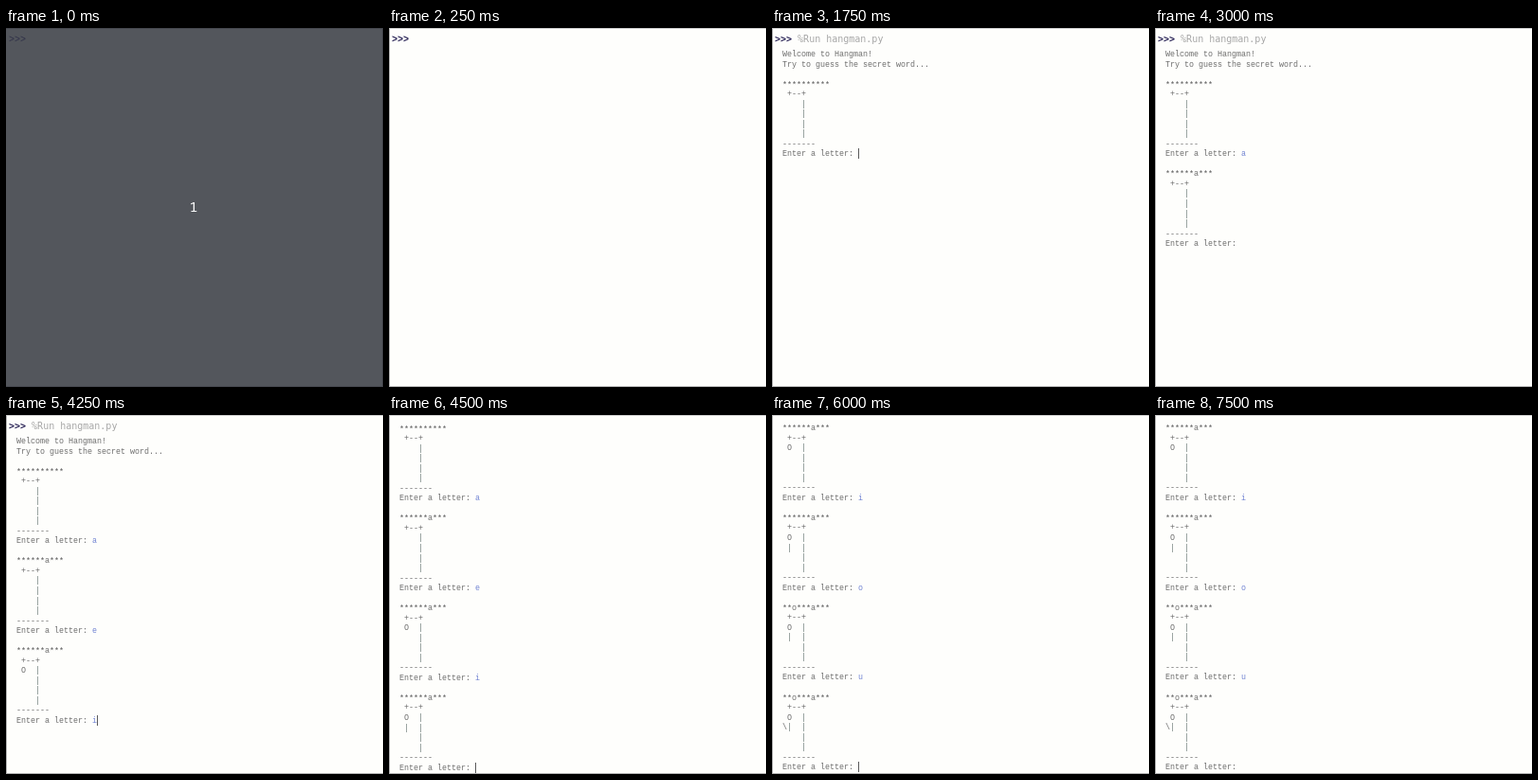
Recreate the animation shown at these times as an HTML page. Size 398 by 379 pixels, loop 8000 ms.

```html
<!DOCTYPE html>
<html lang="en">
<head>
<meta charset="utf-8">
<title>Hangman in a shell</title>
<style>
  html, body { margin: 0; width: 100%; height: 100%; overflow: hidden; background: #fefefc; }
  #stage { position: relative; width: 398px; height: 379px; overflow: hidden; background: #fefefc; }
  #edge {
    position: absolute; inset: 0; box-sizing: border-box;
    border: solid #b4b4b4; border-width: 1px 0 1px 1px; border-top-color: #cfcfcf;
  }
  #page { position: absolute; left: 0; top: 0; white-space: pre; }
  #head { position: absolute; left: 3px; top: 6px; font: 10px/12px "DejaVu Sans Mono", monospace; color: #a6a6a6; }
  #prompt { color: #2a2456; font: bold 10px/12px "Liberation Mono", monospace; }
  .run #prompt { font-family: "DejaVu Sans Mono", monospace; }
  #out { position: absolute; left: 11px; top: 23px; font: 8.333px/10.53px "Liberation Mono", monospace; color: #6c6c6c; }
  #out i { font-style: normal; color: #6c7a77; }
  #out b { font-weight: normal; color: #7083d2; }
  #out s { position: relative; top: 1px; text-decoration: none; color: #555; }
  #out u { position: relative; text-decoration: none; }
  #out u::after { content: ""; position: absolute; left: 0; top: -1px; width: 1px; height: 11px; background: #5a5a5a; }
  #shade { position: absolute; inset: 0; box-sizing: border-box; background: #53565c; border: solid #45474e; border-width: 1px 1px 1px 0; }
  #shade span { position: absolute; left: 3px; top: 6px; font: 10px/12px "Liberation Mono", monospace; color: #2f3048; }
  #shade p { position: absolute; left: 0; top: 177px; width: 396px; margin: 0; text-align: center; font: 15px/20px "Noto Sans Mono", monospace; color: #fff; }
</style>
</head>
<body>
<div id="stage">
  <div id="page">
    <div id="head"><span id="prompt">&gt;&gt;&gt;</span> <span id="command">%Run hangman.py</span></div>
    <div id="out"></div>
  </div>
  <div id="edge"></div>
  <div id="shade"><span>&gt;&gt;&gt;</span><p>1</p></div>
</div>
<script>
const LOOP = 8000, LINE = 10.53, FIRST_Y = 28, LAST_Y = 372.6;
const $ = id => document.getElementById(id);

// word shown, first two rows of the gallows, letter the player types
const rounds = [
  ["**********", "    |", "    |", "a"],
  ["******a***", "    |", "    |", "e"],
  ["******a***", " O  |", "    |", "i"],
  ["******a***", " O  |", " |  |", "o"],
  ["**o***a***", " O  |", " |  |", "u"],
  ["**o***a***", " O  |", "\\|  |", ""]
];

// start time, rounds printed, then flags: r = command run, t = letter typed, c = caret, n = newline
const steps = [
  [0, 0, ""], [1000, 0, "r"],
  [1250, 1, "c"], [1500, 1, ""], [1750, 1, "c"], [2250, 1, "tc"],
  [2750, 2, "c"], [3000, 2, ""], [3250, 2, "tc"], [3500, 2, "t"],
  [3750, 3, ""], [4000, 3, "c"], [4250, 3, "tc"],
  [4500, 4, "c"], [4750, 4, "tc"], [5000, 4, "tn"],
  [5250, 5, "c"], [5750, 5, "tc"],
  [6000, 6, "c"], [6250, 6, ""], [6500, 6, "c"],
  [7000, 6, ""], [7250, 6, "c"], [7500, 6, ""]
];

function roundText([word, head, body, letter], typed) {
  const post = "    |";
  const stars = word.replace(/\*+/g, "<s>$&</s>");
  const gallows = [" +--+", head, body, post, post].join("\n").replace(/\|/g, "<i>|</i>");
  return `\n\n${stars}\n${gallows}\n-------\nEnter a letter: ${typed ? `<b>${letter}</b>` : ""}`;
}

function show([, count, flags]) {
  const has = f => flags.includes(f);
  let text = "";
  if (count) {
    text = "Welcome to Hangman!\nTry to guess the secret word...";
    for (let k = 0; k < count; k++) text += roundText(rounds[k], k < count - 1 || has("t"));
    if (has("n")) text += "\n ";
    if (has("c")) text += "<u></u>";
  }
  $("out").innerHTML = text;
  const running = count > 0 || has("r");
  $("head").className = running ? "run" : "";
  $("command").style.visibility = running ? "visible" : "hidden";
  const lastLine = 1 + 9 * count + (has("n") ? 1 : 0);
  const scroll = Math.max(0, FIRST_Y + LINE * lastLine - LAST_Y);
  $("page").style.transform = `translateY(${-Math.round(scroll)}px)`;
}

let current;
function tick() {
  const t = performance.now() % LOOP;
  const step = steps.filter(s => s[0] <= t).pop();
  if (step !== current) show(current = step);
  $("shade").style.display = t < 250 ? "block" : "none";
  requestAnimationFrame(tick);
}
tick();
</script>
</body>
</html>
```
